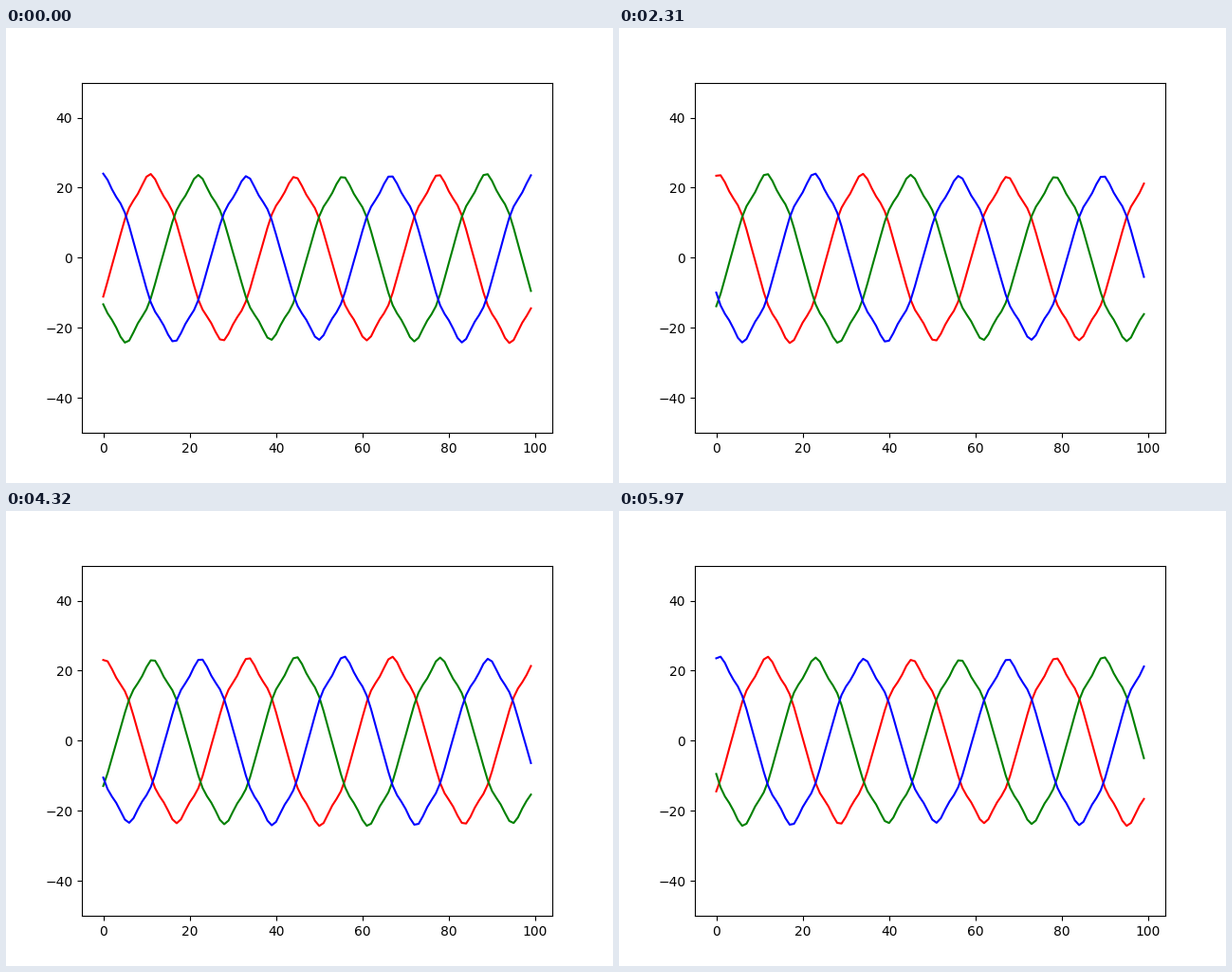
Recreate the animation shown at these times as a matplotlib script. Size 640 by 480 pixels, loop 6000 ms.

```python
import numpy as np
import matplotlib.pyplot as plt
from matplotlib.animation import FuncAnimation

FRAMES, INTERVAL = 200, 30
WINDOW = 100                # samples visible at once
PERIOD = 100 / 3            # samples per wave
PEAK = 10.91                # sample index of the first red crest
HARMONICS = {1: 22.4, 5: 0.85, 7: 0.52}
OFFSET = -0.12


def wave(k, phase):
    """Value of one of the three phases at sample k."""
    # a slow beat sways both the amplitude and the phase
    beat = 0.02 * np.cos(2 * np.pi * (k + 4) / 102)
    theta = 2 * np.pi * ((k - PEAK) / PERIOD - phase / 3) + beat
    shape = sum(a * np.cos(n * theta) for n, a in HARMONICS.items())
    return shape * (1 + beat) + OFFSET


fig, ax = plt.subplots(figsize=(6.4, 4.8), dpi=100)
x = np.arange(WINDOW)
lines = [ax.plot(x, wave(x, p), color=c)[0] for p, c in enumerate("rgb")]
ax.set_ylim(-50, 50)


def update(frame):
    for phase, line in enumerate(lines):
        line.set_ydata(wave(x + frame, phase))
    return lines


anim = FuncAnimation(fig, update, frames=FRAMES, interval=INTERVAL,
                     repeat=True, repeat_delay=0)
plt.show()
```
